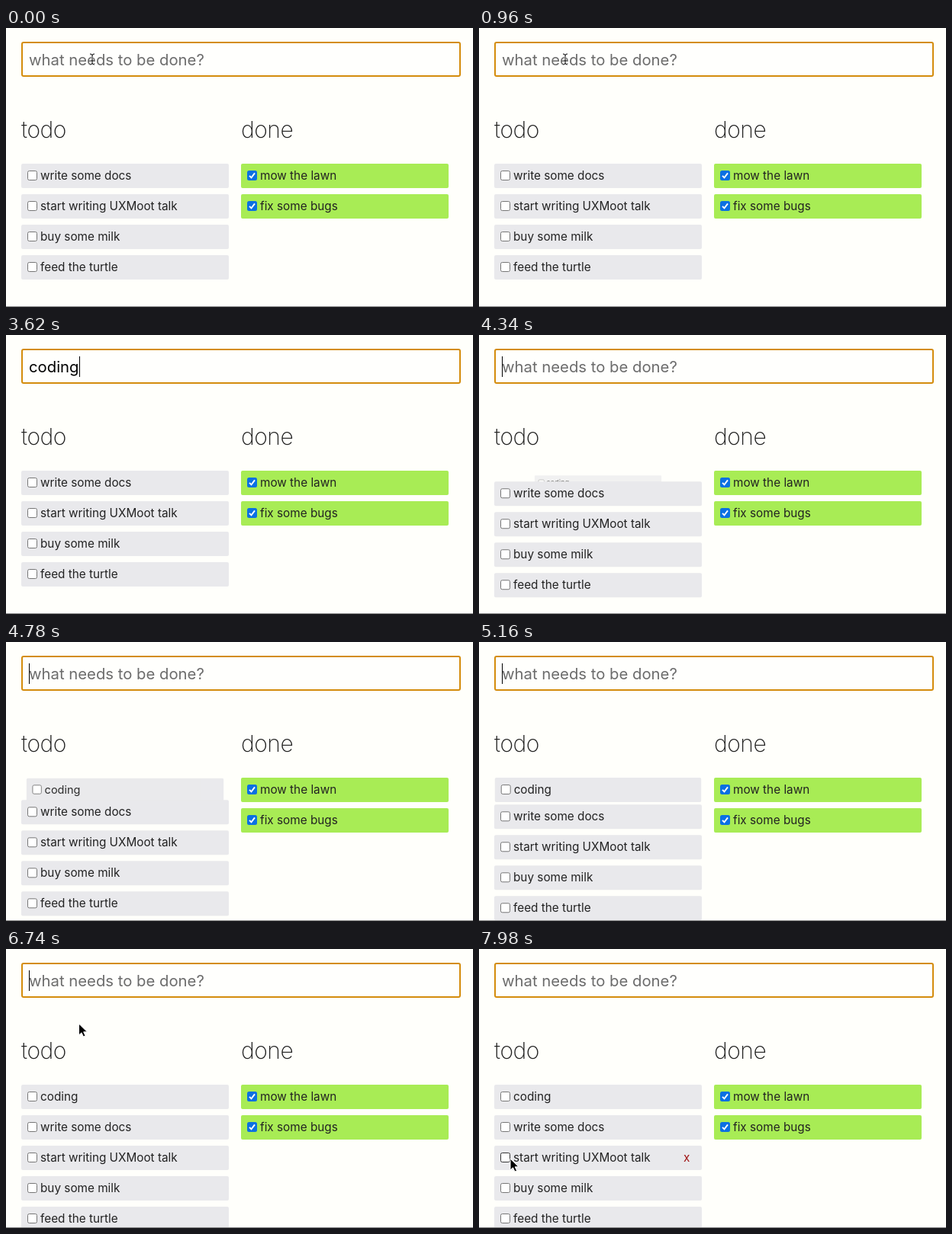
Animation of 612 by 366 pixels, one loop 8 s. Source, as an HTML page:

```html
<!DOCTYPE html>
<html lang="en">
<head>
<meta charset="utf-8">
<title>Todo list</title>
<style>
  html, body { margin: 0; width: 100%; height: 100%; overflow: hidden; background: #fffffb; }
  #stage { position: relative; width: 612px; height: 366px; overflow: hidden; font: 15.3px/32px Inter, sans-serif; color: #222; }
  #stage * { box-sizing: border-box; }
  .field, .caret, h2, .row, .box, .row span, .remove, .pointer, .edge { position: absolute; white-space: pre; }
  .field { left: 20px; top: 18px; width: 576px; height: 46px; padding-left: 8px; border: 2px solid #d48c0c; border-radius: 3px; background: #fffffd; font-size: 20.3px; line-height: 43px; color: #000; }
  .typed { font-weight: 400; }
  .hint { color: #6c6c6c; }
  .caret { top: 8px; width: 1px; height: 27px; background: #000; }
  h2 { top: 113px; margin: 0; font-size: 30px; font-weight: 250; line-height: 40px; letter-spacing: -.5px; }
  .row { top: 0; width: 272px; height: 32px; border-radius: 2px; background: #e9e9ec; }
  .row.done { background: #a8ec55; }
  .box { left: 8px; top: 9px; width: 13px; height: 13px; border: 1px solid #767676; border-radius: 2.5px; background: #fff; }
  .done .box { border: 0; background: #0b70e2; }
  .box svg { position: absolute; left: 0; top: 0; }
  .hover .box { border-color: #333; }
  .row span { left: 25px; }
  .remove { display: none; left: 248px; color: #a01414; }
  .hover .remove { display: block; }
  .pointer { left: 0; top: 0; overflow: visible; }
  .edge { left: 0; top: 365px; width: 612px; height: 1px; background: #858585; }
</style>
</head>
<body>
<div id="stage">
  <div class="field"><span class="typed" id="typed"></span><i class="caret" id="caret"></i><span class="hint" id="hint">what needs to be done?</span></div>
  <h2 style="left:20px">todo</h2>
  <h2 style="left:308px">done</h2>
  <div id="rows"></div>
  <div class="edge"></div>
  <svg class="pointer" id="pointer" width="20" height="20">
    <g id="beam" fill="none">
      <path d="M-3-7Q0-7 0-5Q0-7 3-7M0-5V5M-3 7Q0 7 0 5Q0 7 3 7M-2 2H2" stroke="#fff" stroke-width="2.5"/>
      <path d="M-3-7Q0-7 0-5Q0-7 3-7M0-5V5M-3 7Q0 7 0 5Q0 7 3 7M-2 2H2" stroke="#000"/>
    </g>
    <path id="arrow" d="M0 0V15L3.5 11.8L6 17L8.6 15.9L6.2 10.8H11Z" stroke="#fff"/>
  </svg>
</div>
<script>
const LOOP = 8000, ROW_TOP = 178, ROW_STEP = 40;
const KEY_TICKS = [32, 41, 50, 57, 64, 72];
const WORD = "coding", ENTER = 87, INSERT = 86.8;
const FLIP_TICKS = 45.5, GROW_TICKS = 36, BLINK = 28;
const MOVE_START = 136, MOVE_END = 164;
const $ = id => document.getElementById(id);
const clamp = x => Math.max(0, Math.min(1, x));
const easeOut = (x, power) => 1 - (1 - clamp(x)) ** power;
const smooth = x => { x = clamp(x); return x * x * (3 - 2 * x); };

function addRow(text, left, done) {
  const row = document.createElement("div");
  row.className = done ? "row done" : "row";
  row.style.left = left + "px";
  const tick = done ? '<svg width="13" height="13"><path d="M3 6.8L5.5 9.4L10 3.4" fill="none" stroke="#fff" stroke-width="1.9"/></svg>' : "";
  row.innerHTML = `<div class="box">${tick}</div><span>${text}</span><div class="remove">x</div>`;
  $("rows").append(row);
  return row;
}
function place(row, y, scale = 1) {
  row.style.transform = `translateY(${y}px) scale(${scale})`;
}

const todos = [WORD, "write some docs", "start writing UXMoot talk", "buy some milk", "feed the turtle"]
  .map(text => addRow(text, 20, false));
["mow the lawn", "fix some bugs"].forEach((text, i) =>
  place(addRow(text, 308, true), ROW_TOP + i * ROW_STEP));

// Playback runs in groups of three ticks: held 20, 100 and 20 ms.
function tickAt(ms) {
  const rest = ms % 140;
  return 3 * Math.floor(ms / 140) + (rest < 20 ? 0 : rest < 120 ? 1 : 2);
}

function drawField(tick) {
  const count = tick < ENTER ? KEY_TICKS.filter(k => k <= tick).length : 0;
  $("typed").textContent = WORD.slice(0, count);
  $("hint").style.display = count ? "none" : "inline";
  const lit = tick < KEY_TICKS[0] ? tick >= 23
    : tick < ENTER || Math.floor((tick - ENTER) / BLINK) % 2 === 0;
  // Inline display keeps the caret's static position at the end of the text.
  $("caret").style.display = lit ? "inline" : "none";
}

function drawTodos(tick) {
  const shift = ROW_STEP * easeOut((tick - INSERT) / FLIP_TICKS, 3);
  const grow = easeOut((tick - INSERT) / GROW_TICKS, 5);
  todos.forEach((row, i) => i
    ? place(row, ROW_TOP + (i - 1) * ROW_STEP + shift)
    : place(row, ROW_TOP, grow));
  todos[0].style.opacity = grow;
}

function drawPointer(tick) {
  const k = smooth((tick - MOVE_START) / (MOVE_END - MOVE_START));
  const x = 113 - 72 * k, y = 41 + 234 * k;
  const moving = tick >= MOVE_START, overField = y < 64;
  $("pointer").style.display = moving || tick < KEY_TICKS[0] ? "block" : "none";
  $("pointer").style.transform = `translate(${x}px, ${y}px)`;
  $("beam").style.display = overField ? "inline" : "none";
  $("arrow").style.display = overField ? "none" : "inline";
  todos.forEach((row, i) => {
    const offset = y - ROW_TOP - i * ROW_STEP;
    row.classList.toggle("hover", moving && offset >= 0 && offset < 32);
  });
}

function render(now) {
  const tick = tickAt(now % LOOP);
  drawField(tick);
  drawTodos(tick);
  drawPointer(tick);
}
function loop() {
  render(performance.now());
  requestAnimationFrame(loop);
}
loop();
</script>
</body>
</html>
```
